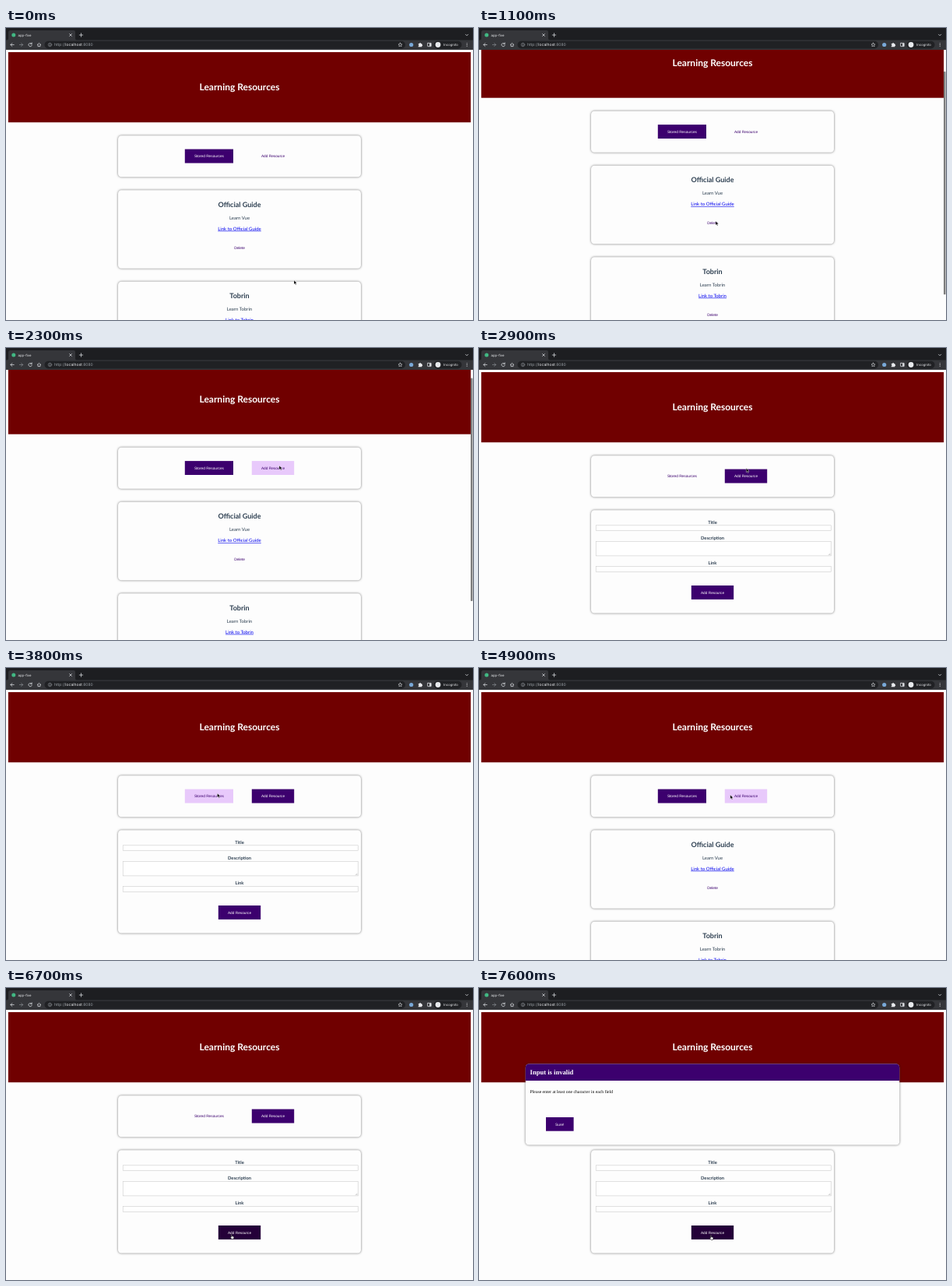
Write an HTML page that moves like this. It is 600x375 px and loops after 8000 ms.

```html
<!DOCTYPE html>
<html lang="en">
<head>
<meta charset="utf-8">
<title>Learning Resources</title>
<style>
  html, body { margin: 0; width: 100%; height: 100%; overflow: hidden; background: #fdfdfd; }
  svg { display: block; width: 600px; height: 375px; }
  text { font: 6px Lato, sans-serif; fill: #2c3e50; text-anchor: middle; text-rendering: geometricPrecision; }
  .h1 { font-size: 12px; font-weight: 700; fill: #fff; }
  .h2 { font-size: 9px; font-weight: 700; }
  .label { font-size: 5.8px; font-weight: 700; }
  .link { fill: #0000ee; text-decoration: underline; }
  .btn text { font: 4.76px "Liberation Sans", Arial, sans-serif; fill: #fff; }
  .btn rect { fill: #3c006e; }
  .btn.hot rect { fill: #240039; }
  .btn.flat rect { fill: none; }
  .btn.flat text { fill: #3c006e; }
  .btn.flat.hot rect { fill: #e8c9fb; }
  .card { fill: #fdfdfd; filter: drop-shadow(0 .8px 1.5px rgba(0, 0, 0, .55)); }
  .field { fill: #fff; stroke: #c4c4c4; stroke-width: .5; }
  .dialog text { text-anchor: start; }
  .dialog .serif { font: 5.71px "Liberation Serif", Times, serif; fill: #000; }
  .dialog .title { font-size: 8.57px; font-weight: 700; fill: #fff; }
  .ui text { font: 4.3px Inter, sans-serif; fill: #e8eaed; text-anchor: start; }
  .ui .url { font-size: 5px; }
  .ui .dim { fill: #9aa0a6; }
  .icon { fill: none; stroke: #dadce0; stroke-width: .75; stroke-linecap: round; stroke-linejoin: round; }
  .soft { stroke: #85898e; }
</style>
</head>
<body>
<svg viewBox="0 0 600 375">
  <rect width="600" height="375" fill="#fdfdfd"/>

  <g id="page">
    <rect x="2.9" y="31" width="594.2" height="90.2" fill="#700000"/>
    <text class="h1" x="300" y="80">Learning Resources</text>
    <rect class="card" x="144" y="138.2" width="312" height="53" rx="4.3"/>
    <g id="tabs"></g>
    <g id="list"></g>
    <g id="form">
      <rect class="card" x="144" y="208.3" width="312" height="132.2" rx="4.3"/>
      <text class="label" x="300" y="225.5">Title</text>
      <rect class="field" x="150.2" y="227.8" width="302" height="6.7"/>
      <text class="label" x="300" y="246">Description</text>
      <rect class="field" x="150.2" y="248.3" width="302" height="18.6"/>
      <path d="M449.2 266l2.2-2.2M450.5 266l.9-.9" stroke="#777" stroke-width=".4"/>
      <text class="label" x="300" y="278.4">Link</text>
      <rect class="field" x="150.2" y="280.6" width="302" height="6.7"/>
    </g>
  </g>

  <g id="dialog" class="dialog">
    <rect class="card" x="59.8" y="97.6" width="480.4" height="104" rx="4.3"/>
    <path d="M59.8 119v-17.1a4.3 4.3 0 0 1 4.3-4.3h471.8a4.3 4.3 0 0 1 4.3 4.3V119z" fill="#3c006e"/>
    <text class="serif title" x="65.6" y="110.8">Input is invalid</text>
    <text class="serif" x="65.6" y="135.3">Please enter at least one character in each field</text>
    <g class="btn">
      <rect x="86" y="166" width="35.6" height="17.7"/>
      <text x="98" y="176.5">Sure!</text>
    </g>
  </g>

  <rect id="thumb" x="597" width="2.5" height="286.5" rx="1.2" fill="#7d7d7d"/>

  <g class="ui">
    <rect width="600" height="28" fill="#1d1e21"/>
    <path d="M0 15.5h1a2 2 0 0 0 2-2V5.500a2.500 2.500 0 0 1 2.500-2.500h81a2.500 2.500 0 0 1 2.500 2.500v8a2 2 0 0 0 2 2H600V28H0z" fill="#35363a"/>
    <rect x="49.500" y="16.700" width="463.500" height="9.800" rx="4.900" fill="#202124"/>
    <rect x="549.500" y="16.700" width="36" height="9.800" rx="4.900" fill="#202124"/>
    <circle cx="9.800" cy="9" r="2.500" fill="#41b883"/>
    <text x="15.500" y="10.600">app-five</text>
    <text class="url" x="62" y="23.300"><tspan class="dim">http://</tspan>localhost<tspan class="dim">:8080</tspan></text>
    <text x="562" y="23.100">Incognito</text>
    <g class="icon">
      <path d="M81.600 7.600l2.800 2.800m0-2.800l-2.800 2.800M96.500 6.800v4.400m-2.200-2.200h4.400M590.500 8.200l1.600 1.600 1.600-1.600"/>
      <path d="M10.200 21.500H5.900m2-2l-2 2 2 2"/>
      <path class="soft" d="M17.400 21.500h4.300m-2-2l2 2-2 2"/>
      <path d="M33 20.300a2.200 2.200 0 1 0 .3 1.900M33.200 18.900v1.700h-1.700"/>
      <path d="M40.300 21.500l2.200-2.100 2.200 2.100m-3.700-.4v2.500h3v-2.500"/>
      <circle class="soft" cx="56.500" cy="21.500" r="2.200"/>
      <path class="soft" d="M56.500 21.400v1.200m0-2.300v0"/>
      <path d="M506.500 19.100l.75 1.600 1.750.2-1.300 1.200.35 1.700-1.550-.85-1.550.85.35-1.700-1.300-1.200 1.750-.2z" stroke-width=".6"/>
      <rect x="541.600" y="19.400" width="4.600" height="4.200" rx=".4"/>
    </g>
    <circle cx="520.700" cy="21.500" r="2.600" fill="#79a9d8"/>
    <path d="M529.800 20h1.400a.9.900 0 0 1 1.800 0h1.300v1.300a.9.900 0 0 1 0 1.800v1.200h-4.500v-1.400a.8.800 0 0 0 0-1.600z" fill="#e8eaed"/>
    <path d="M544.100 19.400h2.100v4.200h-2.100z" fill="#dadce0"/>
    <circle cx="555" cy="21.500" r="3.400" fill="#e8eaed"/>
    <g fill="#dadce0"><circle cx="592.200" cy="19.700" r=".55"/><circle cx="592.200" cy="21.500" r=".55"/><circle cx="592.200" cy="23.300" r=".55"/></g>
  </g>

  <g id="pointer" stroke-linejoin="round">
    <path id="arrow" d="M0 0v5.200l1.200-1.100.9 2 .9-.4-.9-1.900h1.700z" fill="#000" stroke="#fff" stroke-width=".4"/>
    <path id="hand" d="M1.200.4q.7-.3.900.5v1.800l2 .5q.7.200.6 1l-.5 2.300H1.700L.2 4.200q-.1-.7.600-.5l.5.500z" fill="#fff" stroke="#000" stroke-width=".5"/>
  </g>
</svg>

<script>
const $ = id => document.getElementById(id);
const DURATION = 8000, STEP = 100;

// Every button is 17.9 high; returns its element together with its hit box.
function addButton(parent, label, x, y, width) {
  parent.insertAdjacentHTML('beforeend', `<g class="btn">
    <rect x="${x}" y="${y}" width="${width}" height="17.9"/>
    <text x="${x + width / 2}" y="${y + 10.6}">${label}</text></g>`);
  return { el: parent.lastElementChild, x, y, width };
}

function addResource(name, about, top) {
  $('list').insertAdjacentHTML('beforeend', `<g transform="translate(0 ${top})">
    <rect class="card" x="144" width="312" height="100.4" rx="4.3"/>
    <text class="h2" x="300" y="21.700">${name}</text>
    <text x="300" y="37.700">${about}</text>
    <text class="link" x="300" y="51.300">Link to ${name}</text>
    <g class="btn flat"><text x="300" y="75.500">Delete</text></g></g>`);
}

addResource('Official Guide', 'Learn Vue', 208.3);
addResource('Tobrin', 'Learn Tobrin', 325.8);
const storedTab = addButton($('tabs'), 'Stored Resources', 229.8, 155.6, 62.2);
const addTab = addButton($('tabs'), 'Add Resource', 315.8, 155.6, 54.4);
const submit = addButton($('form'), 'Add Resource', 272.8, 305, 54.4);

// [time, x, y]
const pointerPath = [
  [0, 370, 324], [200, 370, 324], [300, 415, 314], [400, 438, 285], [500, 350, 255], [600, 304, 248],
  [1700, 304, 248], [1900, 316, 212], [2100, 345, 162], [2300, 351, 151],
  [2800, 351, 151], [3100, 328, 161], [3500, 287, 164.5], [3800, 271.5, 161],
  [4200, 271.5, 161], [4500, 282, 163], [5000, 333, 163], [5700, 333, 163],
  [5900, 314.5, 166], [6100, 256, 300], [6200, 256, 300], [6500, 280, 315], [6900, 296.3, 317]
];
// [time, offset]
const scrollPath = [
  [800, 0], [900, 9], [1000, 24], [1100, 31.5], [1200, 35], [1300, 33], [1500, 20], [1700, 10.5], [2600, 10.5], [2700, 0]
];

function sample(path, t) {
  const next = path.findIndex(key => key[0] > t);
  if (next === 0) return path[0].slice(1);
  if (next < 0) return path[path.length - 1].slice(1);
  const a = path[next - 1], b = path[next];
  const k = (t - a[0]) / (b[0] - a[0]);
  return a.slice(1).map((v, i) => v + (b[i + 1] - v) * k);
}

const show = (id, on) => $(id).style.display = on ? '' : 'none';
const between = (t, from, to) => t >= from && t < to;

function render(t) {
  const [x, y] = sample(pointerPath, t);
  const [scroll] = sample(scrollPath, t);
  const formOpen = between(t, 2700, 4200) || t >= 5100;
  const isHot = b => x >= b.x && x <= b.x + b.width && y + scroll >= b.y && y + scroll <= b.y + 17.9;
  const paint = (b, flat, hot) => {
    b.el.classList.toggle('flat', flat);
    b.el.classList.toggle('hot', hot);
    return hot;
  };

  $('page').setAttribute('transform', `translate(0 ${-scroll})`);
  show('form', formOpen);
  show('list', !formOpen);
  show('dialog', t >= 7300);
  show('thumb', between(t, 900, 2600));
  $('thumb').setAttribute('y', 30 + scroll * 0.82);

  const overButton = [
    paint(storedTab, formOpen, isHot(storedTab)),
    paint(addTab, !formOpen, isHot(addTab)),
    paint(submit, false, formOpen && isHot(submit))
  ].some(Boolean);
  const hand = overButton && t >= 5000;
  show('hand', hand);
  show('arrow', !hand);
  $('pointer').setAttribute('transform', `translate(${x} ${y})`);
}

const start = performance.now();
function tick() {
  const t = (performance.now() - start) % DURATION;
  render(Math.floor(t / STEP) * STEP);
  requestAnimationFrame(tick);
}
tick();
</script>
</body>
</html>
```
